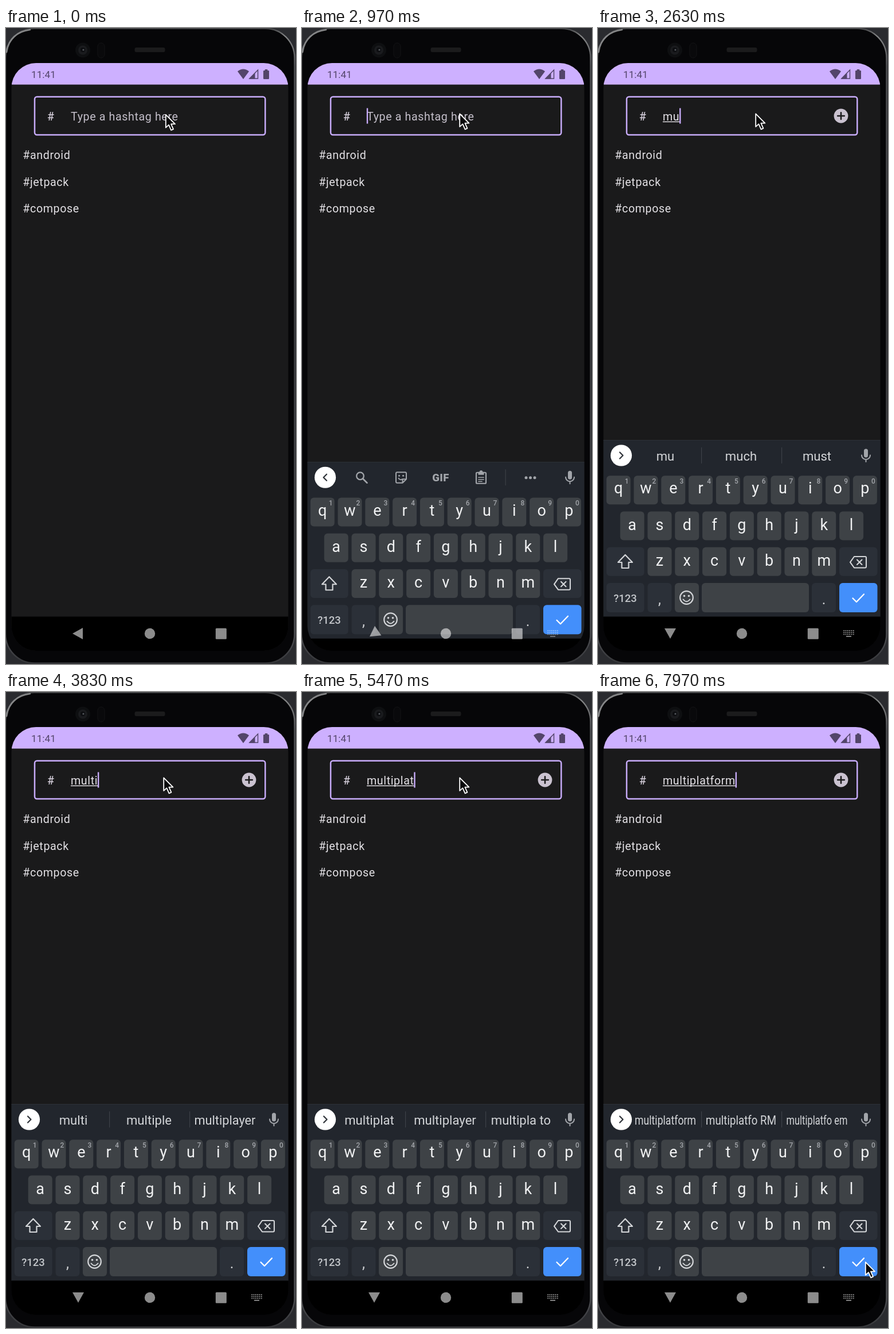
Write an HTML page that moves like this. It is 506 by 1107 pixels and loops after 8 s.

```html
<!DOCTYPE html>
<html lang="en">
<head>
<meta charset="utf-8">
<title>Hashtag field</title>
<style>
html, body { margin: 0; width: 100%; height: 100%; overflow: hidden; background: #2a2b2f; }
svg { display: block; width: 506px; height: 1107px; }
text { font-family: Roboto, sans-serif; white-space: pre; }
.body { font-size: 19.66px; letter-spacing: .61px; }
.mid { text-anchor: middle; }
.line { fill: none; stroke-linecap: round; stroke-linejoin: round; }
</style>
</head>
<body>
<svg id="stage" viewBox="0 0 506 1107" xmlns="http://www.w3.org/2000/svg"></svg>
<script>
const LOOP = 8000;
const WORD = "multiplatform";
const FIRST_KEY = 1925, KEY_GAP = 420, IME_LAG = 60;
// middle and right suggestion for each typed length; the left one is the typed text
const HINTS = [
  ["my", "me"], ["much", "must"], ["multi", "mulch"], ["multi", "multiple"],
  ["multiple", "multiplayer"], ["multiple", "multiply"], ["multiple", "multiply"],
  ["multiplayer", "multiplan"], ["multiplayer", "multipla to"],
  ["multiplat", "multiplatform"], ["multiplat", "multiplatform"],
  ["multiplatfo", "multiplatform"], ["multiplatfo RM", "multiplatfo em"]
];
const SLOTS = [[117.5, 107], [249.5, 123], [382, 107]];

const KEY = "#3e4246", DARK_KEY = "#2b3038", GREY = "#a2a5aa", LIGHT = "#d3d5d8";

const rect = (x, y, w, h, fill, rx = 0, more = "") =>
  `<rect x="${x}" y="${y}" width="${w}" height="${h}" rx="${rx}" fill="${fill}" ${more}/>`;
const circle = (x, y, r, fill, more = "") =>
  `<circle cx="${x}" cy="${y}" r="${r}" fill="${fill}" ${more}/>`;
const text = (x, y, s, fill, size, more = "") =>
  `<text x="${x}" y="${y}" fill="${fill}" font-size="${size}" ${more}>${s}</text>`;
const stroke = (d, color, w, more = "") =>
  `<path class="line" d="${d}" stroke="${color}" stroke-width="${w}" ${more}/>`;
const MID = 'class="mid"';

function device() {
  return `<defs>
    <linearGradient id="rim" x1="0" y1="0" x2="0" y2="1">
      <stop offset="0" stop-color="#444547"/><stop offset=".012" stop-color="#858687"/>
      <stop offset=".06" stop-color="#505154"/><stop offset=".5" stop-color="#3c3d40"/>
      <stop offset=".95" stop-color="#505155"/><stop offset="1" stop-color="#36373a"/>
    </linearGradient>
    <clipPath id="screen"><rect x="9.5" y="61" width="483" height="1023" rx="43"/></clipPath>
  </defs>`
    + rect(0, 0, 506, 1107, "#2a2b2f")
    + rect(-1, .8, 504.5, 1104.7, "#060608", 51, 'stroke="url(#rim)" stroke-width="2.4"')
    + stroke("M1 42Q6 8 42 3", "#858687", 2.6)
    + circle(134, 38.5, 13, "#0e0f11")
    + circle(134, 38.5, 8, "#1a1b1e")
    + circle(134, 38, 4, "#0c0d10")
    + circle(135, 38, 1.6, "#55585e")
    + rect(160, 26, 12, 26, "#09090b", 6, 'stroke="#131315"')
    + rect(224.5, 34, 53, 8, "#1b1b1c", 3);
}

function statusBar() {
  const c = "#53456a";
  return rect(9, 61, 484, 37.5, "#cdb0ff")
    + text(44, 87, "11:41", c, 17.2)
    + `<path d="M404 75.5Q414 67.5 424 75.5L414 89Z" fill="${c}"/>
       <path d="M439.5 73V88H425Z" fill="none" stroke="${c}" stroke-width="1.5"/>
       <path d="M434.5 78V88.5H424Z" fill="${c}"/>`
    + rect(449, 74, 10, 15, c, 1.2) + rect(451.7, 72, 4.6, 3, c);
}

function content() {
  return rect(50, 119.8, 402.3, 66.3, "none", 4, 'stroke="#c8acfa" stroke-width="2.5"')
    + text(72, 160.7, "#", "#d2ccd8", 19.66, 'class="body" font-weight="500"')
    + text(113, 160.7, "Type a hashtag here", "#c4bfca", 19.66, 'class="body" id="holder"')
    + text(113, 160.7, "", "#e4e1e6", 19.66, 'class="body" id="typed"')
    + rect(113, 162.6, 0, 1.4, "#e4e1e6", 0, 'id="under"')
    + rect(113, 139.5, 2.4, 27, "#c8acfa", 0, 'id="caret"')
    + `<g id="add">${circle(424, 153, 12.4, "#cac2d0")}${stroke("M424 147.2V158.8M418.2 153H429.8", "#1b1b1c", 2.6)}</g>`
    + ["#android", "#jetpack", "#compose"].map((s, i) =>
      text(29.3, 228.2 + i * 46.3, s, "#e2e0e4", 19.66, 'class="body"')).join("");
}

function letterRow(letters, x, y, digits) {
  return [...letters].map((ch, i) => {
    const kx = x + i * 47.8;
    return rect(kx, y, 42, 50, KEY, 6)
      + text(kx + 21, y + (digits ? 31 : 32), ch, "#f1f2f3", 27, MID)
      + (digits ? text(kx + 35.5, y + 13.5, (i + 1) % 10, GREY, 12, MID + ' font-weight="500"') : "");
  }).join("");
}

function tools() {
  const dots = [391, 398.5, 406].map(x => circle(x, 744.5, 2.5, GREY)).join("");
  return stroke("M43 738.5L37.5 744L43 749.5", "#30343a", 2.2)
    + circle(101.5, 741.5, 6.3, "none", `stroke="${GREY}" stroke-width="2.3"`)
    + stroke("M106.5 746.5L113.5 753.5", GREY, 2.6)
    + stroke("M166 735H180Q182 735 182 737V747L175.5 753.5H166Q164 753.5 164 751.5V737Q164 735 166 735ZM182 747H175.5V753.5M168.5 745.5Q171 749.5 175 747", GREY, 2)
    + circle(169.5, 741, 1.5, GREY) + circle(176.5, 741, 1.5, GREY)
    + text(242, 750.5, "GIF", GREY, 18.5, MID + ' font-weight="900" letter-spacing=".4"')
    + rect(304, 735.5, 17, 19, "none", 1.5, `stroke="${GREY}" stroke-width="2.2"`)
    + rect(307.5, 734.5, 10, 5, GREY) + circle(312.5, 734.5, 2.8, GREY)
    + stroke("M308 744H317M308 747.5H317M308 751H314", GREY, 1.7)
    + rect(354.5, 730, 1.2, 28, "#3c4047") + dots;
}

function keyboard() {
  const mark = (d, w = 2.4) => stroke(d, LIGHT, w);
  return rect(9, 717, 484, 308, "#22262d") + rect(9, 717, 484, 1, "#2c3037")
    + rect(9, 1024.5, 484, 70, "#000")
    + circle(40.5, 744, 18.6, "#fff")
    + `<g id="tools">${tools()}</g><g id="sugg">`
    + stroke("M38 738.5L43.5 744L38 749.5", "#30343a", 2.2)
    + rect(180, 730, 1.2, 28, "#3c4047") + rect(320, 730, 1.2, 28, "#3c4047")
    + SLOTS.map(() => text(0, 0, "", LIGHT, 22.1, MID)).join("") + "</g>"
    + rect(464, 732.5, 7, 15, GREY, 3.5)
    + stroke("M460 743.5A7.5 7.5 0 0 0 475 743.5M467.5 751.5V755", GREY, 2)
    + letterRow("qwertyuiop", 14.7, 779.3, true)
    + letterRow("asdfghjkl", 38.7, 841.5)
    + letterRow("zxcvbnm", 86.5, 903.7)
    + rect(14.7, 903.7, 66, 50, DARK_KEY, 6)
    + mark("M47.5 917L60 930H53.5V940H41.5V930H35Z", 2.2)
    + rect(421, 903.7, 66.5, 50, DARK_KEY, 6)
    + mark("M447 920H466Q468 920 468 922V937.5Q468 939.5 466 939.5H447L440 929.8Z", 2.1)
    + mark("M452 925.5L460.5 934M460.5 925.5L452 934", 2.1)
    + rect(14.7, 966, 66, 51, DARK_KEY, 6)
    + text(47.5, 998.5, "?123", "#c3c6ca", 18.5, MID + ' font-weight="500"')
    + rect(86.5, 966, 42, 51, DARK_KEY, 6) + text(107.5, 1002.5, ",", LIGHT, 25, MID)
    + rect(134, 966, 42, 51, KEY, 6)
    + circle(154.5, 991.5, 11.3, "none", `stroke="${LIGHT}" stroke-width="2.2"`)
    + circle(150.5, 988.5, 1.8, LIGHT) + circle(158.5, 988.5, 1.8, LIGHT)
    + mark("M148.5 994.5Q154.5 1002 160.5 994.5", 2)
    + rect(181, 966, 187, 51, KEY, 6)
    + rect(373, 966, 42, 51, DARK_KEY, 6) + text(394, 1002.5, ".", LIGHT, 25, MID)
    + rect(421, 966, 66.5, 51, "#438ffb", 6)
    + stroke("M444.5 992.5L451 999L464 985.5", "#fff", 2.3);
}

function navBar() {
  let dots = "";
  for (let r = 0; r < 3; r++)
    for (let c = 0; c < 6; c++) dots += rect(428.3 + c * 3.3, 1048 + r * 3.2, 1.9, 1.9, "#fff");
  return `<g opacity=".55"><path id="back" d="M116 1054L134 1044V1064Z" fill="#fff"/>`
    + circle(251, 1054, 9.2, "#fff") + rect(365.8, 1044.8, 19, 19, "#fff", 1.5)
    + `<g id="imeKey">${dots}${rect(433, 1058, 9, 1.8, "#fff")}</g></g>`;
}

const $ = id => document.getElementById(id);
$("stage").innerHTML = device()
  + `<g clip-path="url(#screen)">${rect(9, 61, 484, 1024, "#1a1a1b")}${statusBar()}${content()}`
  + `${rect(9, 1024.5, 484, 60, "#000")}<g id="ime">${keyboard()}</g>${navBar()}</g>`
  + `<path id="mouse" d="M0 0V22.5L5.2 17.8L9.3 27L13.2 25.3L9.2 16.3H16.2Z" fill="#08080a" stroke="#fff" stroke-width="1.8" stroke-linejoin="round"/>`;

const ui = {};
for (const id of ["holder", "typed", "under", "caret", "add", "tools", "sugg", "ime", "back", "imeKey", "mouse"]) ui[id] = $(id);
const slots = [...ui.sugg.querySelectorAll("text")];

const span = (t, a, b) => Math.min(1, Math.max(0, (t - a) / (b - a)));
const smooth = p => p * p * (3 - 2 * p);
const mix = (a, b, p) => a + (b - a) * p;
const show = (el, on) => el.setAttribute("visibility", on ? "visible" : "hidden");
const lettersAt = t => Math.min(WORD.length, Math.max(0, Math.floor((t - FIRST_KEY) / KEY_GAP) + 1));

// cubic-bezier(.2, 0, 0, 1)
function emphasize(x) {
  let lo = 0, hi = 1;
  for (let i = 0; i < 24; i++) {
    const s = (lo + hi) / 2;
    if (.6 * (1 - s) * (1 - s) * s + s * s * s < x) lo = s; else hi = s;
  }
  return lo * lo * (3 - 2 * lo);
}

function caretOn(t, n) {
  const since = n ? FIRST_KEY + (n - 1) * KEY_GAP : 600;
  return t >= since && (t - since) % 1000 < 500;
}

let shown = -1;
function suggest(n) {
  if (n === shown) return;
  shown = n;
  show(ui.tools, !n);
  show(ui.sugg, n);
  if (!n) return;
  [WORD.slice(0, n), ...HINTS[n - 1]].forEach((s, i) => {
    const [x, room] = SLOTS[i], el = slots[i];
    el.textContent = s;
    const fit = Math.min(1, room / el.getComputedTextLength());
    el.setAttribute("transform", `translate(${x} 753.3) scale(${fit} 1)`);
  });
}

function draw(t) {
  const n = lettersAt(t), known = lettersAt(t - IME_LAG);
  const s = WORD.slice(0, n);
  if (ui.typed.textContent !== s) ui.typed.textContent = s;
  const width = k => k ? ui.typed.getSubStringLength(0, k) : 0;
  show(ui.holder, !n);
  show(ui.add, n);
  ui.under.setAttribute("width", width(known));
  ui.caret.setAttribute("x", 112.8 + width(n));
  show(ui.caret, caretOn(t, n));
  suggest(known);

  const rise = emphasize(span(t, 825, 1100));
  ui.ime.setAttribute("transform", `translate(0 ${367 * (1 - rise)})`);
  show(ui.ime, t > 825);
  const turn = smooth(span(t, 890, 1080));
  ui.back.setAttribute("transform", `rotate(${-90 * turn} 125.5 1053.5)`);
  ui.imeKey.setAttribute("opacity", span(t, 870, 1010));

  const nudge = smooth(span(t, 0, 230)), go = smooth(span(t, 7300, 7880));
  const x = mix(mix(278.8, 275.2, nudge), 466.8, go);
  const y = mix(mix(150.9, 149.3, nudge), 992.3, go);
  ui.mouse.setAttribute("transform", `translate(${x} ${y})`);
}

const start = performance.now();
function tick() {
  draw((performance.now() - start) % LOOP);
  requestAnimationFrame(tick);
}
tick();
</script>
</body>
</html>
```
